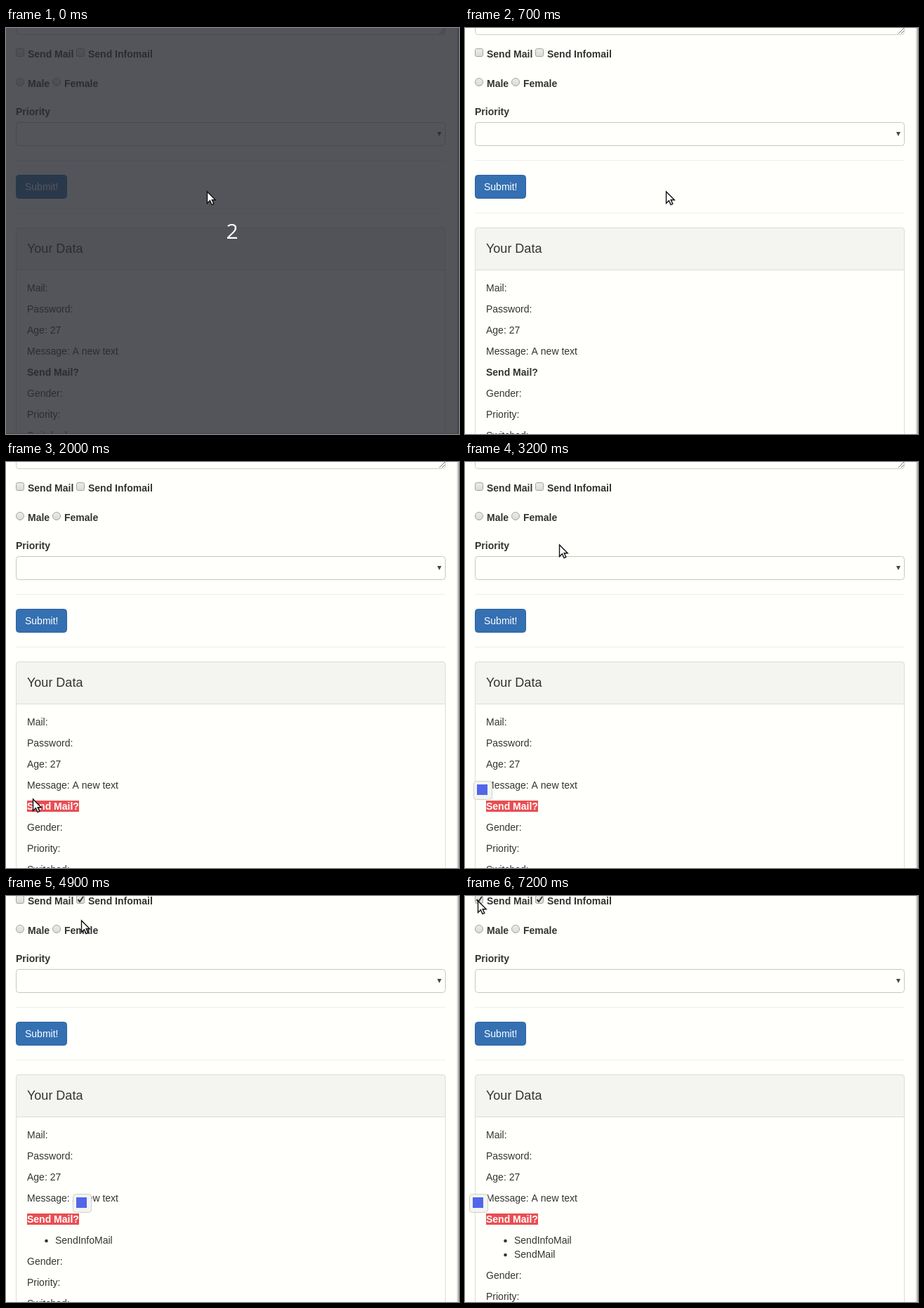
An HTML page with a canvas that plays this animation: 645 px wide and 578 px high, repeating every 8000 ms.

```html
<!DOCTYPE html>
<html lang="en">
<head>
<meta charset="utf-8">
<title>Form demo</title>
<style>
  html, body { margin: 0; width: 100%; height: 100%; overflow: hidden; background: #fffffb; }
  canvas { display: block; }
</style>
</head>
<body>
<canvas id="stage" width="645" height="578"></canvas>
<script>
const LOOP = 8000, STEP = 100;
const W = 645, H = 578;
const INK = '#333';
const ctx = document.getElementById('stage').getContext('2d');

// Pointer path: time, x, y of the hot spot
const POINTER = [
  [0, 286, 232], [800, 286, 232], [1100, 116, 476], [1200, 103, 485], [1300, 103, 485],
  [1500, 103, 486], [1700, 103, 486], [2000, 38, 479], [2300, 38, 479], [2400, 24, 479],
  [2500, 24, 479], [3200, 134, 117], [3400, 141, 73], [3900, 106, 34], [4500, 106, 34],
  [4600, 107, 34], [5800, 107, 34], [6100, 16, 9], [6300, 16, 9], [6400, 18, 7],
  [6500, 18, 7], [6600, 18, 6], [LOOP, 18, 6]
];
const ARROW = new Path2D('M.5 1V17.5L4.4 13.8L7 19.6L9.8 18.4L7.2 12.7H12.2Z');
const IBEAM = new Path2D('M-4 -9H-1L0 -8L1 -9H4M0 -8V8M-4 9H-1L0 8L1 9H4');

function pointerAt(t) {
  const i = Math.max(1, POINTER.findIndex(k => k[0] >= t));
  const [t0, x0, y0] = POINTER[i - 1], [t1, x1, y1] = POINTER[i];
  const p = (t - t0) / (t1 - t0);
  return [Math.round(x0 + (x1 - x0) * p), Math.round(y0 + (y1 - y0) * p)];
}

function rect(x, y, w, h, color) {
  ctx.fillStyle = color;
  ctx.fillRect(x, y, w, h);
}

function text(str, x, y, { size = 14, bold = false, color = INK } = {}) {
  ctx.font = `${bold ? 'bold ' : ''}${size}px "Liberation Sans", Arial, sans-serif`;
  ctx.fillStyle = color;
  ctx.fillText(str, x, y);
}

// Bordered box covering whole pixels x..x+w, y..y+h
function box(x, y, w, h, radius, fill, border) {
  ctx.beginPath();
  ctx.roundRect(x + .5, y + .5, w - 1, h - 1, radius);
  ctx.fillStyle = fill;
  ctx.fill();
  ctx.lineWidth = 1;
  ctx.strokeStyle = border;
  ctx.stroke();
}

function line(points, color, width = 1) {
  ctx.beginPath();
  points.forEach(([x, y]) => ctx.lineTo(x, y));
  ctx.strokeStyle = color;
  ctx.lineWidth = width;
  ctx.stroke();
}

function controlFill(y) {
  const g = ctx.createLinearGradient(0, y, 0, y + 12);
  g.addColorStop(0, '#ededea');
  g.addColorStop(1, '#d9d9d6');
  return g;
}

function checkbox(x, label, checked) {
  box(x, 29, 12, 12, 2, controlFill(29), '#a3a3a0');
  if (checked) line([[x + 2.5, 35], [x + 5, 38], [x + 10, 31]], INK, 2);
  text(label, x + 17, 42, { bold: true });
}

function radio(x, label) {
  box(x, 71, 12, 12, 6, controlFill(71), '#a3a3a0');
  text(label, x + 17, 84, { bold: true });
}

function drawForm(checks) {
  box(14, -60, 612, 70, 4, '#fffffb', '#ccc');
  line([[617, 8], [625, 0]], '#777');
  line([[621, 8], [625, 4]], '#777');

  checkbox(14, 'Send Mail', checks > 1);
  checkbox(100, 'Send Infomail', checks > 0);
  radio(14, 'Male');
  radio(66, 'Female');

  text('Priority', 14, 124, { bold: true });
  box(14, 134, 612, 34, 4, '#fffffb', '#c6c6c3');
  ctx.fillStyle = '#444';
  ctx.fill(new Path2D('M614 148H620L617 154Z'));

  rect(14, 188, 612, 1, '#eeeeea');
  box(14, 209, 73, 34, 4, '#3470b2', '#2d629e');
  text('Submit!', 27, 231, { color: '#fff' });
  rect(14, 263, 612, 1, '#eeeeea');
}

function drawPanel(checks, selectedFrom) {
  box(14, 284, 612, 400, 4, '#fffffb', '#dcdcd9');
  box(14, 284, 612, 61, [4, 4, 0, 0], '#f4f4f0', '#dcdcd9');
  text('Your Data', 30, 320, { size: 18 });
  ['Mail:', 'Password:', 'Age: 27', 'Message: A new text']
    .forEach((s, i) => text(s, 30, 375 + 30 * i));

  text('Send Mail?', 30, 495, { bold: true });
  if (selectedFrom < 104) {
    ctx.save();
    ctx.beginPath();
    ctx.rect(selectedFrom, 482, 104 - selectedFrom, 16);
    ctx.clip();
    rect(30, 482, 74, 16, '#e94e52');
    text('Send Mail?', 30, 495, { bold: true, color: '#fff' });
    ctx.restore();
  }

  ['SendInfoMail', 'SendMail'].slice(0, checks).forEach((s, i) => {
    const y = 525 + 20 * i;
    ctx.beginPath();
    ctx.arc(57.5, y - 4, 2.3, 0, 7);
    ctx.fillStyle = INK;
    ctx.fill();
    text(s, 70, y);
  });
  const listHeight = checks ? 10 + 20 * checks : 0;
  ['Gender:', 'Priority:', 'Switched:']
    .forEach((s, i) => text(s, 30, 525 + listHeight + 30 * i));
}

function drawPopup(x, y) {
  box(x, y, 27, 27, 4, '#f4f4f1', '#cfcfcc');
  rect(x + 5, y + 5, 15, 15, '#5166ea');
}

function drawPointer(t) {
  const [x, y] = pointerAt(t);
  ctx.save();
  ctx.translate(x, y);
  if (t >= 1200 && t < 2000) {
    ctx.translate(.5, .5);
    ctx.lineWidth = 1;
    ctx.strokeStyle = '#111';
    ctx.stroke(IBEAM);
  } else {
    ctx.fillStyle = '#fff';
    ctx.fill(ARROW);
    ctx.lineWidth = 1.4;
    ctx.strokeStyle = '#111';
    ctx.stroke(ARROW);
  }
  ctx.restore();
}

function drawCountdown(t) {
  rect(0, 0, W, H, 'rgba(41, 43, 50, .8)');
  rect(0, H - 1, W, 1, '#523f4e');
  ctx.font = '30px "Open Sans", "Noto Sans", sans-serif';
  ctx.textAlign = 'center';
  ctx.fillStyle = '#fff';
  ctx.fillText(t < 400 ? '2' : '1', 322, 300);
  ctx.textAlign = 'left';
}

function draw(t) {
  const checks = t < 4900 ? 0 : t < 7200 ? 1 : 2;
  const selectedFrom = t < 1800 ? 104 : t < 2000 ? pointerAt(t)[0] : 30;

  rect(0, 0, W, H, '#fffffb');
  ctx.save();
  ctx.translate(0, checks ? -30 : 0);
  drawForm(checks);
  drawPanel(checks, selectedFrom);
  ctx.restore();
  rect(641, 0, 2, H, '#f1f1ee');
  rect(643, 0, 2, H, '#b9b7b4');

  if (t >= 2600 && t < 4600) drawPopup(12, 454);
  if (t >= 4900 && t < 7100) drawPopup(95, 424);
  if (t >= 7200) drawPopup(6, 424);
  if (t < 700) drawCountdown(t);
  drawPointer(t);
}

const start = performance.now();
function tick() {
  const t = (performance.now() - start) % LOOP;
  draw(Math.floor(t / STEP) * STEP);
  requestAnimationFrame(tick);
}
tick();
</script>
</body>
</html>
```
